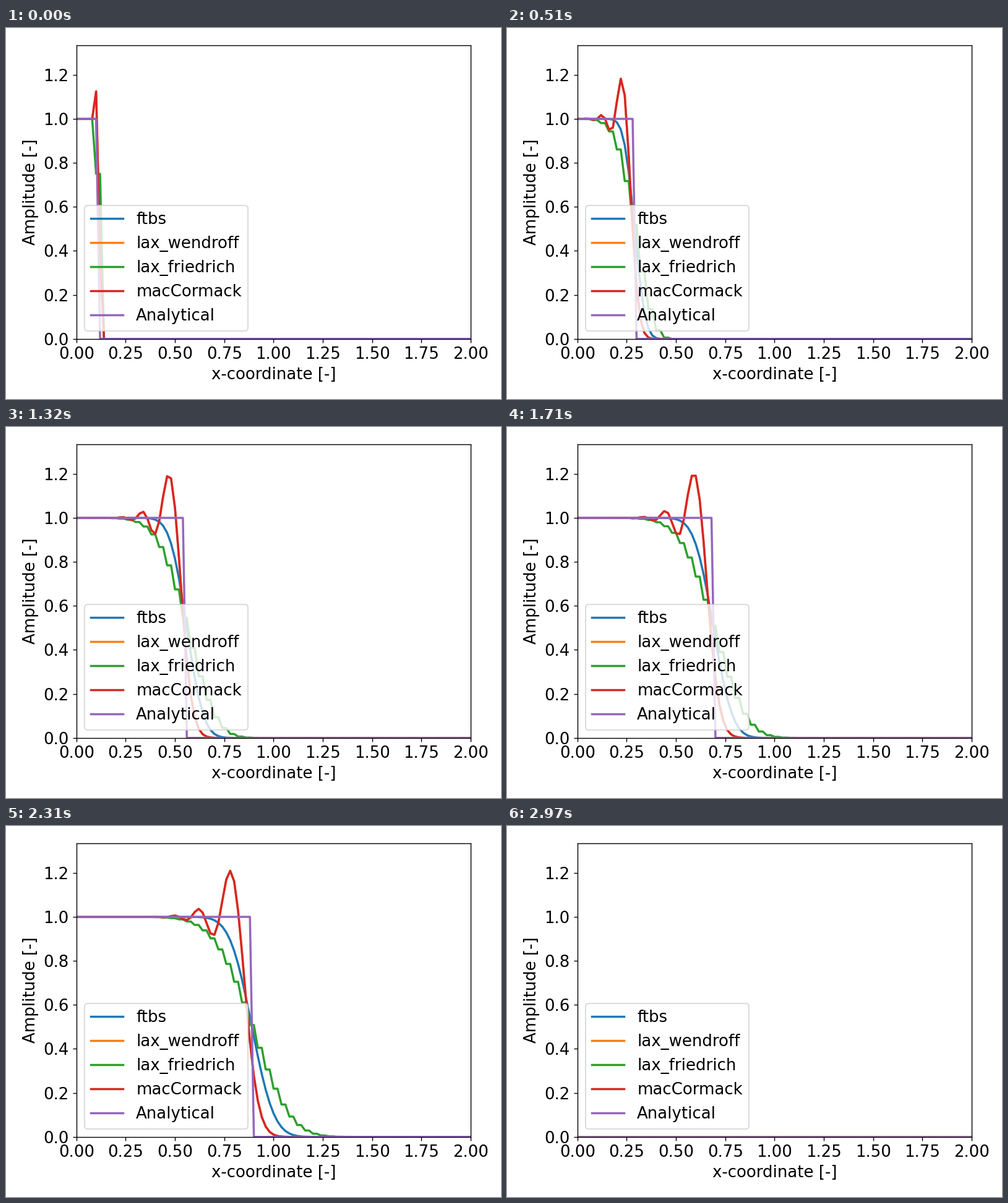
These frames come from a looping animation (800x600 px, 3000 ms). A matplotlib script:

```python
import numpy as np
import matplotlib.pyplot as plt
from matplotlib.animation import FuncAnimation

FRAMES = 100
NX = 101
C = 0.5          # Courant number
DX = 0.02
EDGE = 0.1       # initial position of the front
DPI = 125

x = np.linspace(0, 2, NX)


def front(step):
    return np.where(x <= EDGE + C * DX * step + 1e-9, 1.0, 0.0)


def ftbs(u):
    v = u.copy()
    v[1:] -= C * (u[1:] - u[:-1])
    return v


def lax_wendroff(u):
    v = u.copy()
    v[1:-1] += (-C / 2 * (u[2:] - u[:-2])
                + C**2 / 2 * (u[2:] - 2 * u[1:-1] + u[:-2]))
    return v


def lax_friedrich(u):
    v = u.copy()
    v[1:-1] = (1 + C) / 2 * u[:-2] + (1 - C) / 2 * u[2:]
    return v


def mac_cormack(u):
    p = u.copy()
    p[:-1] -= C * (u[1:] - u[:-1])
    v = u.copy()
    v[1:-1] = 0.5 * (u[1:-1] + p[1:-1] - C * (p[1:-1] - p[:-2]))
    return v


def solve(scheme):
    """All time levels after the initial one; the last row stays empty."""
    rows = np.zeros((FRAMES, NX))
    u = front(0)
    for n in range(FRAMES - 1):
        u = scheme(u)
        rows[n] = u
    return rows


exact = np.array([front(n + 1) for n in range(FRAMES)])
exact[-1] = 0

curves = {
    "ftbs": solve(ftbs),
    "lax_wendroff": solve(lax_wendroff),
    "lax_friedrich": solve(lax_friedrich),
    "macCormack": solve(mac_cormack),
    "Analytical": exact,
}

plt.rcParams.update({"font.size": 15, "font.family": "DejaVu Sans",
                     "lines.linewidth": 2})
fig, ax = plt.subplots(figsize=(6.4, 4.8), dpi=DPI)
ax.set_xlim(0, 2)
ax.set_ylim(0, 1.334)
ax.set_xlabel("x-coordinate [-]")
ax.set_ylabel("Amplitude [-]")
lines = [ax.plot(x, rows[0], label=name)[0] for name, rows in curves.items()]
ax.legend(loc="lower left")

# margins follow the text metrics at the default resolution
fig.set_dpi(100)
fig.tight_layout()
fig.set_dpi(DPI)


def update(i):
    for line, rows in zip(lines, curves.values()):
        line.set_ydata(rows[i])
    return lines


anim = FuncAnimation(fig, update, frames=FRAMES, interval=30,
                     repeat=True, repeat_delay=0)
plt.show()
```
